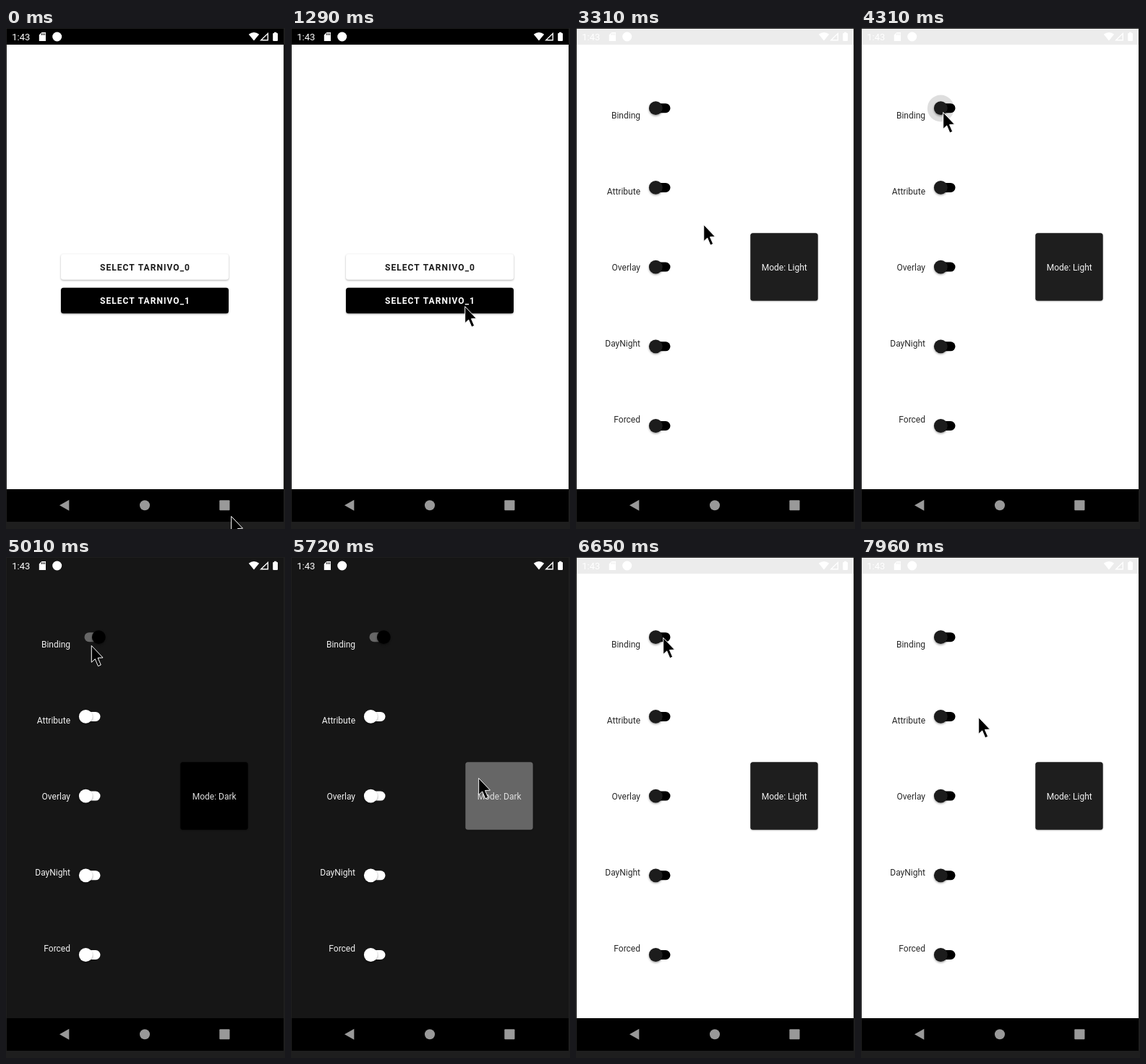
An HTML page with a canvas that plays this animation: 386x692 px, repeating every 8 s.

```html
<!DOCTYPE html>
<html lang="en">
<head>
<meta charset="utf-8">
<title>Theme switch demo</title>
<style>
  html, body { margin: 0; width: 100%; height: 100%; overflow: hidden; background: #1e1e1e; }
  canvas { display: block; width: 386px; height: 692px; }
</style>
</head>
<body>
<canvas id="stage"></canvas>
<script>
const W = 386, H = 692, LOOP = 8000;
const canvas = document.getElementById('stage');
const ctx = canvas.getContext('2d');
const dpr = window.devicePixelRatio || 1;
canvas.width = W * dpr;
canvas.height = H * dpr;

// Stretches in which the picture changes: first step, last step, number of steps
const BURSTS = [
  [70, 800, 11], [880, 970, 2], [1120, 1290, 3], [2450, 3230, 11], [3310, 4000, 10],
  [4150, 4380, 4], [5010, 5800, 11], [5870, 6650, 11], [6730, 7500, 11], [7580, 7960, 6]
];
const OPEN = 2450, DARK_ON = 4370, DARK_OFF = 6640;

// Pointer path: time, x, y
const PATH = [
  [0, 311, 674], [800, 240, 384], [2610, 240, 385], [3230, 178, 276], [4000, 113, 116],
  [4940, 113, 116], [5600, 259, 305], [5800, 259, 305], [6400, 120, 111], [6650, 120, 111],
  [7320, 262, 308], [7540, 262, 308], [7960, 162, 221]
];

const LIGHT = { bg: '#fff', bar: '#ececec', text: '#2a2a2a', thumb: '#1c1c1c', track: '#000',
                card: '#1e1e1e', cardText: '#f2f2f2', glow: 0.32, mode: 'Mode: Light' };
const DARK = { bg: '#161616', bar: '#161616', text: '#f0f0f0', thumb: '#fff', track: '#fff',
               card: '#000', cardText: '#dedede', glow: 0.4, mode: 'Mode: Dark' };
const LABELS = ['Binding', 'Attribute', 'Overlay', 'DayNight', 'Forced'];

const clamp = (v, a = 0, b = 1) => Math.min(b, Math.max(a, v));
const ramp = (t, a, b) => clamp((t - a) / (b - a));
const smooth = u => u * u * (3 - 2 * u);

function snap(t) {
  let held = 0;
  for (const [a, b, n] of BURSTS) {
    if (t < a) break;
    const step = (b - a) / (n - 1);
    held = Math.min(b, a + Math.floor((t - a + 8) / step) * step);
  }
  return held;
}

function pointerAt(t) {
  for (let i = 1; i < PATH.length; i++) {
    const [t0, x0, y0] = PATH[i - 1], [t1, x1, y1] = PATH[i];
    if (t <= t1) {
      const u = smooth(ramp(t, t0, t1));
      return [x0 + (x1 - x0) * u, y0 + (y1 - y0) * u];
    }
  }
  return PATH[PATH.length - 1].slice(1);
}

function rect(x, y, w, h, fill) {
  ctx.fillStyle = fill;
  ctx.fillRect(x, y, w, h);
}

function round(x, y, w, h, r, fill) {
  ctx.beginPath();
  ctx.roundRect(x, y, w, h, r);
  ctx.fillStyle = fill;
  ctx.fill();
}

function disc(x, y, r, fill) {
  ctx.beginPath();
  ctx.arc(x, y, r, 0, Math.PI * 2);
  ctx.fillStyle = fill;
  ctx.fill();
}

function poly(points, fill) {
  ctx.beginPath();
  points.forEach(([x, y]) => ctx.lineTo(x, y));
  ctx.closePath();
  if (fill) {
    ctx.fillStyle = fill;
    ctx.fill();
  }
}

function text(str, x, y, fill, align, font = '400 12px', spacing = 0) {
  ctx.font = font + ' Roboto, sans-serif';
  ctx.letterSpacing = spacing + 'px';
  ctx.textAlign = align;
  ctx.fillStyle = fill;
  ctx.fillText(str, x, y);
}

function withShadow(alpha, blur, dy, draw) {
  ctx.save();
  ctx.shadowColor = `rgba(0,0,0,${alpha})`;
  ctx.shadowBlur = blur * dpr;
  ctx.shadowOffsetY = dy * dpr;
  draw();
  ctx.restore();
}

// Touch glow that spreads from (cx, cy) inside a rounded box
function ripple(box, cx, cy, radius, alpha) {
  if (alpha <= 0 || radius <= 0) return;
  ctx.save();
  ctx.beginPath();
  ctx.roundRect(...box, 3.5);
  ctx.clip();
  disc(cx, cy, radius, `rgba(255,255,255,${alpha})`);
  ctx.restore();
}

function button(y, fill, ink, label, lifted) {
  withShadow(0.32, lifted ? 6 : 2.5, lifted ? 3 : 1, () => round(76, y, 232, 35.5, 3.5, fill));
  text(label, 192.5, y + 22.3, ink, 'center', '700 12px', 1.05);
}

function startScreen(t) {
  rect(1, 1, 383, 681, '#000');
  rect(1, 23, 383, 614, '#fff');
  button(312.3, '#fff', '#1a1a1a', 'SELECT TARNIVO_0', false);
  const pressed = t >= 870 && t < 1200;
  button(358.7, '#000', '#fff', 'SELECT TARNIVO_1', pressed);
  if (t >= 870) {
    ripple([76, 358.7, 232, 35.5], 240, 384, 150 + (t - 870) * 1.2, 0.24 * (1 - ramp(t, 1050, 1280)));
  }
}

function toggle(y, theme, on, halo) {
  const x = on ? 128.3 : 110.3;
  const dark = theme === DARK;
  if (halo) disc(x, y + 0.3, 18.5, dark ? `rgba(255,255,255,${halo})` : `rgba(0,0,0,${halo})`);
  round(108.5, y - 6.5, 22, 13, 6.5, on ? '#666' : theme.track);
  withShadow(0.4, 3, 1.3, () => disc(x, y, 9.4, on ? '#000' : theme.thumb));
}

function cardGlow(t, theme) {
  const [press, release] = t < 6600 ? [5560, 5790] : [7320, 7540];
  if (t < press) return;
  const alpha = theme.glow * (1 - ramp(t, release, release + 220));
  const [x, y] = pointerAt(press + 60);
  ripple([241.3, 283.3, 93.4, 93.4], x, y, 20 + (t - press) * 0.75, alpha);
}

function themeScreen(t) {
  const dark = t >= DARK_ON && t < DARK_OFF;
  const theme = dark ? DARK : LIGHT;
  rect(1, 1, 383, 681, '#000');
  rect(1, 1, 383, 22, theme.bar);
  rect(1, 23, 383, 614, theme.bg);

  let halo = 0;
  if (t >= 4140 && t < DARK_ON) halo = 0.13 * ramp(t, 4080, 4290);
  if (t >= 6410 && t < DARK_OFF) halo = 0.13 * ramp(t, 6380, 6570);

  LABELS.forEach((label, i) => {
    text(label, 89, 124.5 + i * 105.1, theme.text, 'right');
    toggle(110.7 + i * 109.7, theme, dark && i === 0, i === 0 ? halo : 0);
  });

  withShadow(0.3, 2, 0.8, () => round(241.3, 283.3, 93.4, 93.4, 3.5, theme.card));
  cardGlow(t, theme);
  text(theme.mode, 288.2, 334.5, theme.cardText, 'center');
}

function scaled(s, alpha, draw) {
  ctx.save();
  ctx.translate(192.5, 330);
  ctx.scale(s, s);
  ctx.translate(-192.5, -330);
  ctx.globalAlpha = alpha;
  draw();
  ctx.restore();
}

function statusIcons(holes) {
  const ink = '#fff';
  text('1:43', 8.3, 17, ink, 'left', '400 13px');
  poly([[49.5, 6], [55, 6], [55, 18], [45.8, 18], [45.8, 9.6]], ink);
  [49, 51, 53].forEach(x => rect(x, 7.4, 1, 2.4, holes));
  disc(70.7, 12, 6.5, ink);

  ctx.beginPath();
  ctx.moveTo(343, 17.5);
  ctx.lineTo(335.8, 8.8);
  ctx.quadraticCurveTo(343, 3.2, 350.2, 8.8);
  ctx.closePath();
  ctx.fillStyle = ink;
  ctx.fill();

  poly([[362.3, 7.6], [362.3, 16.8], [352.8, 16.8]]);
  ctx.strokeStyle = ink;
  ctx.lineWidth = 1.4;
  ctx.stroke();

  rect(371, 5.8, 3.2, 2, ink);
  round(369.2, 7, 6.8, 11, 1, ink);
}

function navIcons() {
  const ink = '#999';
  poly([[74, 659.3], [87.3, 651.8], [87.3, 666.8]], ink);
  disc(192, 659.3, 7, ink);
  round(295.3, 652.3, 14.2, 14, 1, ink);
}

function pointer(x, y) {
  ctx.save();
  ctx.translate(x + 0.7, y + 0.5);
  poly([[0, 0], [0, 23], [5, 18.4], [9.2, 28.3], [13, 26.6], [8.8, 17], [15.8, 16.6]], '#000');
  ctx.strokeStyle = '#fff';
  ctx.lineWidth = 1;
  ctx.stroke();
  ctx.restore();
}

function draw(t) {
  ctx.setTransform(dpr, 0, 0, dpr, 0, 0);
  rect(0, 0, W, H, '#1e1e1e');
  rect(1, 1, 383, 681, '#000');

  ctx.save();
  ctx.beginPath();
  ctx.rect(1, 1, 383, 681);
  ctx.clip();
  if (t < OPEN) {
    startScreen(t);
  } else {
    const p = t < 2900 ? 1 - Math.exp(-(t - 2440) / 73) : 1;
    if (p < 1) scaled(1 + 0.052 * p, 1 - 0.33 * ramp(t, 2450, 2600), () => startScreen(t));
    // fade the whole window in through its first step
    scaled(0.85 + 0.15 * p, clamp((t - 2430) / 90), () => themeScreen(t));
  }
  const lightBar = t >= OPEN && !(t >= DARK_ON && t < DARK_OFF);
  statusIcons(lightBar ? LIGHT.bar : '#000');
  navIcons();
  ctx.restore();

  pointer(...pointerAt(t));
}

function tick() {
  draw(snap(performance.now() % LOOP));
  requestAnimationFrame(tick);
}
tick();
</script>
</body>
</html>
```
